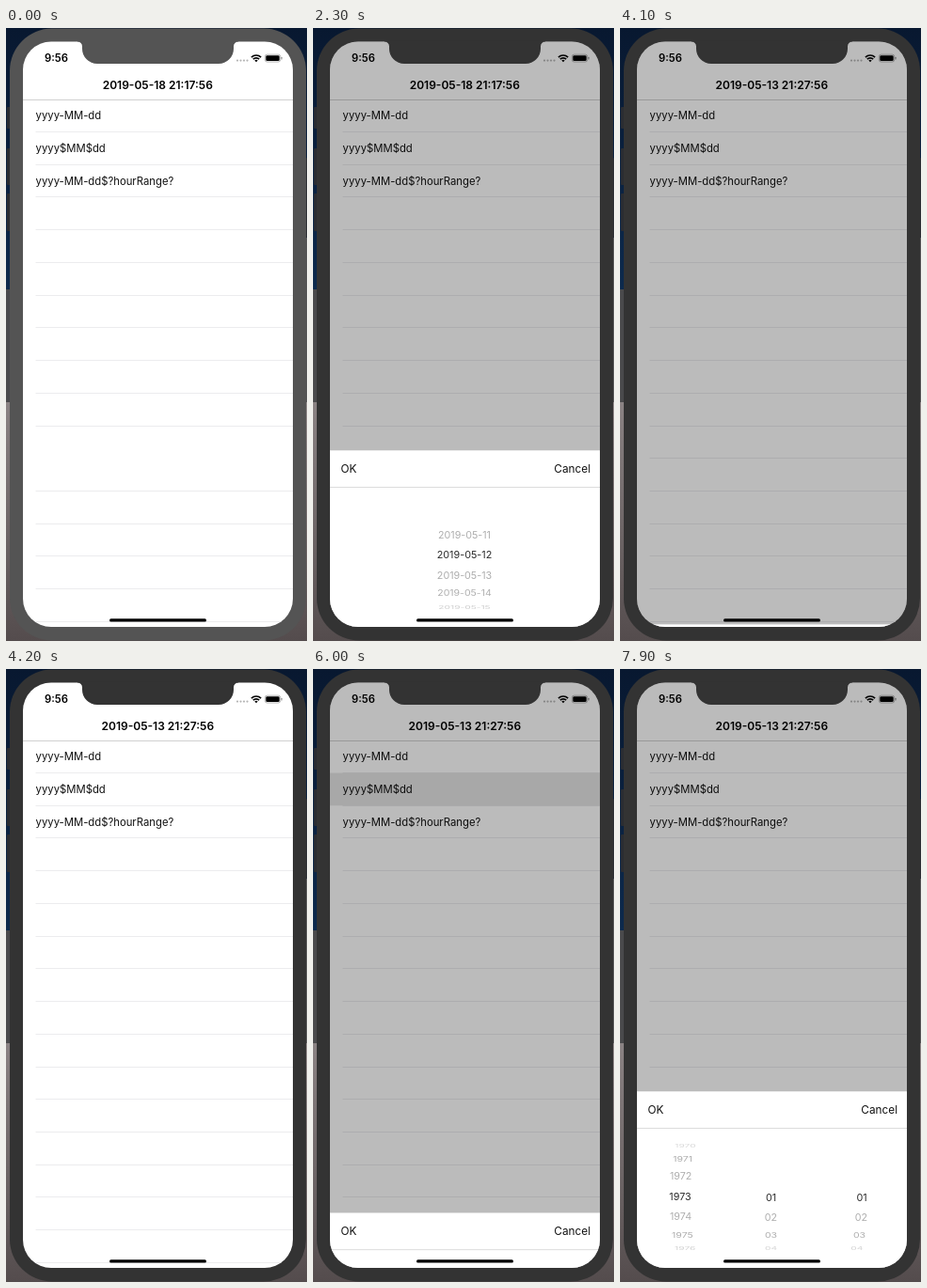
Recreate the animation shown at these times as an HTML page. Size 320x652 px, loop 8000 ms.

```html
<!DOCTYPE html>
<html lang="en">
<head>
<meta charset="utf-8">
<title>Date picker demo</title>
<style>
  html, body { margin: 0; width: 100%; height: 100%; overflow: hidden; }
  svg { display: block; width: 100vw; height: 100vh; }
  text { font: 11.3px Inter, Roboto, sans-serif; fill: #111; }
  .bold { font-size: 12px; font-weight: 600; fill: #000; }
  .button { font-size: 11.8px; }
  .wheel text { font-size: 10.8px; text-anchor: middle; }
</style>
</head>
<body>
<svg viewBox="0 0 320 652" xmlns="http://www.w3.org/2000/svg">
  <defs>
    <linearGradient id="sky" x2="0" y2="1">
      <stop offset="0" stop-color="#081830"/>
      <stop offset="1" stop-color="#0d2a4d"/>
    </linearGradient>
    <linearGradient id="ground" x2="0" y2="1">
      <stop offset="0" stop-color="#8a8283"/>
      <stop offset="1" stop-color="#544c4d"/>
    </linearGradient>
    <clipPath id="screen"><rect x="18" y="14.5" width="287" height="622.5" rx="30"/></clipPath>
    <clipPath id="wheelArea"><rect x="17" y="505" width="289" height="113"/></clipPath>
  </defs>

  <rect width="320" height="280" fill="url(#sky)"/>
  <rect y="278" width="320" height="120" fill="#4a4a4c"/>
  <rect x="160" y="223" width="160" height="180" fill="#525254"/>
  <rect y="398" width="320" height="254" fill="url(#ground)"/>
  <g fill="#2b2d32">
    <rect x="1" y="84" width="4" height="23" rx="1"/>
    <rect x="1" y="128" width="4" height="39" rx="1"/>
    <rect x="1" y="176" width="4" height="40" rx="1"/>
    <rect x="317" y="138" width="3" height="85" rx="1"/>
  </g>
  <rect id="body" x="4" y=".5" width="315" height="651" rx="45"/>

  <g clip-path="url(#screen)">
    <rect x="17" y="14" width="289" height="624" fill="#fff"/>
    <rect x="17" y="76" width="289" height="1" fill="#d0d0d0"/>
    <g id="lines" fill="#ececee"></g>
    <rect id="highlight" x="17" width="289" height="34.8" fill="#dcdcdc"/>
    <g id="formats"></g>
    <text id="heading" class="bold" x="161.3" y="64.8" text-anchor="middle"></text>

    <text class="bold" x="41" y="36.2" style="font-size:11.3px">9:56</text>
    <g id="signal" fill="#b5b5b5"></g>
    <g fill="none" stroke="#000" stroke-width="1.7">
      <path d="M260.9 31.1a7.2 7.2 0 0 1 10.2 0"/>
      <path d="M262.8 33.2a4.5 4.5 0 0 1 6.4 0"/>
    </g>
    <path d="M264.3 34.6a2.4 2.4 0 0 1 3.4 0L266 36.3z"/>
    <rect x="275.3" y="28.2" width="16.4" height="7.8" rx="2.2" fill="none" stroke="#999" stroke-width=".7"/>
    <rect x="276.3" y="29.2" width="14.4" height="5.8" rx="1.3"/>
    <rect x="292.5" y="30.7" width="1" height="2.8" rx=".5" fill="#888"/>

    <rect id="dim" x="17" y="14" width="289" height="624" opacity=".265"/>

    <g id="sheet">
      <rect x="17" y="449.3" width="289" height="190" fill="#fff"/>
      <rect x="17" y="488" width="289" height="1" fill="#dcdcdc"/>
      <text class="button" x="29.6" y="472.7">OK</text>
      <text class="button" x="295" y="472.7" text-anchor="end">Cancel</text>
      <g id="wheels" clip-path="url(#wheelArea)"></g>
    </g>
    <rect x="110" y="628.3" width="103" height="3.2" rx="1.6"/>
  </g>
  <path id="notch" d="M76 13.5v1a5 5 0 0 1 5 5v2.5a16 16 0 0 0 16 16h129a16 16 0 0 0 16-16v-2.5a5 5 0 0 1 5-5v-1z"/>
</svg>
<script>
const LOOP = 8000, STEP = 100;
const ROW_TOP = 75.8, ROW_HEIGHT = 34.73;
const WHEEL = { x: 161, y: 562, radius: 63, angle: Math.PI / 9 };
const SHEET_HEIGHT = 188;

const $ = id => document.getElementById(id);
const clamp = v => Math.min(1, Math.max(0, v));
const ease = (t, start, length, power = 3) =>
  1 - Math.pow(1 - clamp((t - start) / length), power);

function add(parent, tag, attrs, text = '') {
  const node = document.createElementNS('http://www.w3.org/2000/svg', tag);
  for (const key in attrs) node.setAttribute(key, attrs[key]);
  node.textContent = text;
  parent.append(node);
  return node;
}

const set = (id, name, value) => $(id).setAttribute(name, value);
const show = (node, visible) => { node.style.display = visible ? '' : 'none'; };

const lines = Array.from({ length: 16 }, (_, i) =>
  add($('lines'), 'rect', { x: 31.5, y: Math.round(110 + ROW_HEIGHT * i), width: 275, height: 1 }));

['yyyy-MM-dd', 'yyyy$MM$dd', 'yyyy-MM-dd$?hourRange?'].forEach((format, i) =>
  add($('formats'), 'text', { x: 31.6, y: 97.1 + ROW_HEIGHT * i }, format));

for (let i = 0; i < 4; i++) add($('signal'), 'circle', { cx: 246 + i * 3.5, cy: 34.6, r: 1.1 });

function makeWheel(x, count, label) {
  const group = add($('wheels'), 'g', { class: 'wheel' });
  const items = Array.from({ length: count }, (_, i) => add(group, 'text', { y: 4 }, label(i)));
  return { x, group, items };
}

const pad = n => String(n).padStart(2, '0');
const dates = makeWheel(161, 8, i => `2019-05-${11 + i}`);
const years = makeWheel(64, 9, i => String(1970 + i));
const months = makeWheel(160.5, 5, i => pad(i + 1));
const days = makeWheel(257, 5, i => pad(i + 1));

// Rows sit on a cylinder seen from the front.
function turn(wheel, position) {
  wheel.items.forEach((item, i) => {
    const offset = i - position, distance = Math.abs(offset);
    show(item, distance < 3.5);
    const angle = offset * WHEEL.angle, depth = Math.cos(angle);
    const scale = 1 - .11 * (1 - depth);
    const x = WHEEL.x + (wheel.x - WHEEL.x) * scale;
    const y = WHEEL.y + WHEEL.radius * Math.sin(angle);
    item.setAttribute('transform', `translate(${x} ${y}) scale(${scale} ${scale * depth})`);
    item.style.fill = distance < .5 ? '#2a2a2a' : '#adadad';
    item.style.opacity = clamp(3.5 - distance);
  });
}

function datePosition(t) {
  if (t < 2300) return 0;
  if (t < 3100) return 1.08 + .86 * ease(t, 2300, 300, 2);
  return t < 3200 ? 1.98 : 2;
}

function sheetLift(t) {
  if (t < 3900) return ease(t, 1098, 400);
  if (t < 5900) return 1 - ease(t, 3860, 320);
  return ease(t, 5960, 340);
}

function render(t) {
  const active = t >= 1100;
  for (const id of ['body', 'notch']) set(id, 'fill', active ? '#333' : '#545454');
  show(lines[10], active);

  const second = t >= 5900;
  const touched = second ? 5900 : 1100;
  set('highlight', 'y', ROW_TOP + (second ? ROW_HEIGHT : 0));
  set('highlight', 'opacity', active ? 1 - clamp((t - touched) / 400) : 0);
  $('heading').textContent = t < 3900 ? '2019-05-18 21:17:56' : '2019-05-13 21:27:56';

  const open = (active && t < 4200) || t >= 6000;
  show($('dim'), open);
  show($('sheet'), open);
  set('sheet', 'transform', `translate(0 ${SHEET_HEIGHT * (1 - sheetLift(t))})`);

  show(dates.group, !second);
  for (const wheel of [years, months, days]) show(wheel.group, second);
  turn(dates, datePosition(t));
  turn(years, 3.04 * ease(t, 7100, 800, 1.7));
  turn(months, 0);
  turn(days, 0);
}

const begin = performance.now();
function tick() {
  const t = (performance.now() - begin) % LOOP;
  render(Math.floor(t / STEP) * STEP);
  requestAnimationFrame(tick);
}
tick();
</script>
</body>
</html>
```
